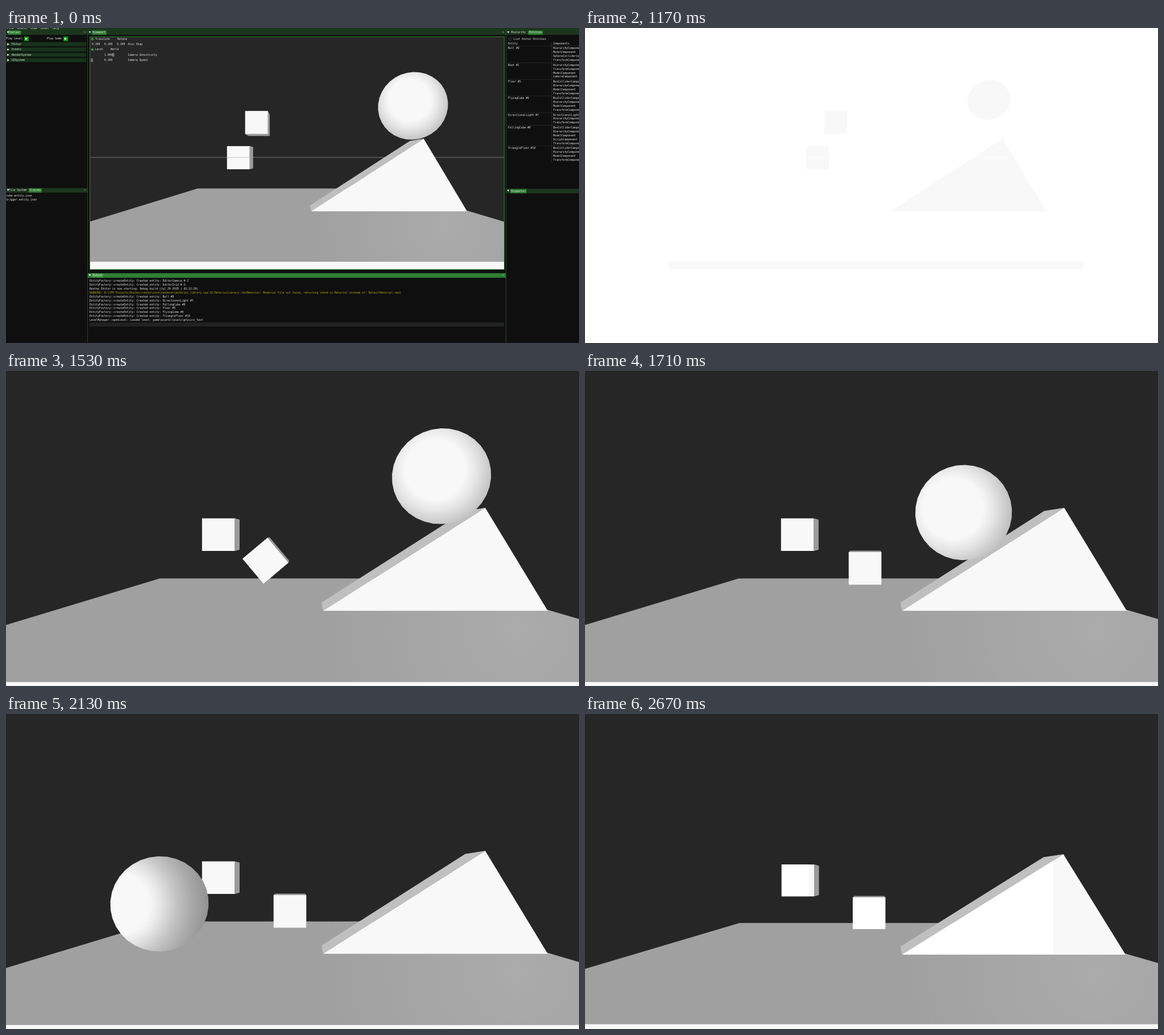
Write an HTML page with a canvas that moves like this. It is 1008 px wide and 555 px high and loops after 3120 ms.

```html
<!DOCTYPE html>
<html lang="en">
<head>
<meta charset="utf-8">
<title>Physics test</title>
<style>
html, body { margin: 0; width: 100%; height: 100%; overflow: hidden; background: #262626; }
canvas { display: block; width: 1008px; height: 555px; }
</style>
</head>
<body>
<canvas id="stage" width="1008" height="555"></canvas>
<script>
const ctx = document.getElementById('stage').getContext('2d');
const LOOP = 3120, STEP = 30;
const WHITE = '#f8f8f8', SIDE = '#9b9b9b', SKY = '#262626';
const GREEN = '#2f7f33', DARK_GREEN = '#1c361d', PANEL = '#0f0f0f';
const EYE = { x: 504, y: 288 };

// Views: x scale, y scale, x shift, y shift.
const EDITOR_VIEW = [0.6945, 0.7052, 149.3, 25.05];
const GAME_VIEW = [1, 1, 0, 0];
const END_VIEW = [0.995, 0.975, 2.7, 12];

const RAMP = [[558, 422.5], [843, 241], [953, 422.5]];
const FLYING = { x: 373.6, y: 288.4, angle: 0 };
const CUBE_START = { x: 419.6, y: 200.6, angle: 0 };
const BALL_START = { x: 816, y: 159 };

const lerp = (a, b, k) => a + (b - a) * k;
const clamp01 = v => Math.max(0, Math.min(1, v));

function rect(x, y, w, h, color) {
  ctx.fillStyle = color;
  ctx.fillRect(x, y, w, h);
}

function poly(points, color) {
  ctx.beginPath();
  points.forEach(([x, y]) => ctx.lineTo(x, y));
  ctx.closePath();
  ctx.fillStyle = color;
  ctx.fill();
}

function disc(x, y, r, color) {
  ctx.beginPath();
  ctx.arc(x, y, r, 0, Math.PI * 2);
  ctx.fillStyle = color;
  ctx.fill();
}

// Tiny text is set large and scaled down to keep fractional advances.
function text(str, x, y, color = '#e8e8e8') {
  ctx.save();
  ctx.translate(x, y);
  ctx.scale(0.1, 0.1);
  ctx.font = '47.4px "DejaVu Sans Mono", monospace';
  ctx.textBaseline = 'middle';
  ctx.fillStyle = color;
  ctx.fillText(str, 0, 0);
  ctx.restore();
}

// ---------- motion ----------

function ballAt(t) {
  const u = Math.max(0, t - 1285), slopeEnd = 1866;
  if (t < slopeEnd) {
    const x = 816 - 0.00083 * u * u;
    return { x, y: 186 + (765 - x) * (x > 765 ? 0.55 : 0.64) };
  }
  if (t < 1890) {
    const k = (t - slopeEnd) / (1890 - slopeEnd);
    return { x: lerp(535.8, 509.5, k), y: lerp(332, 332.5, k) };
  }
  return { x: 509.5 - 0.998 * (t - 1890), y: 332.5 + (t - 1890) / 120 };
}

function cubeAt(t) {
  const hit = 1390, land = 1530;
  if (t < hit) {
    const u = Math.max(0, t - 1282);
    return { x: CUBE_START.x, y: CUBE_START.y + 0.00254 * u * u, angle: 0 };
  }
  if (t < land) {
    const k = (t - hit) / (land - hit);
    return { x: lerp(CUBE_START.x, 456.5, k), y: 230 + 104.3 * (0.6 * k + 0.4 * k * k), angle: 50 * k };
  }
  const tip = clamp01((t - land) / 120), slide = clamp01((t - land) / 300);
  return {
    x: lerp(456.5, 499.5, 1 - (1 - slide) ** 2),
    y: lerp(334.3, 347.8, tip * tip),
    angle: lerp(50, 90, tip)
  };
}

// ---------- scene ----------

function cubeFront({ x, y, angle }) {
  return [0, 1, 2, 3].map(i => {
    const a = (angle + 90 * i - 135) * Math.PI / 180, r = 28.7 * Math.SQRT2;
    return [x + r * Math.cos(a), y + r * Math.sin(a)];
  });
}

function cube(pose, color = WHITE) {
  const front = cubeFront(pose);
  const back = front.map(([x, y]) => [lerp(EYE.x, x, 0.915), lerp(EYE.y, y, 0.915)]);
  front.forEach((p, i) => {
    const j = (i + 1) % 4;
    poly([p, front[j], back[j], back[i]], SIDE);
  });
  poly(front, color);
}

function ball({ x, y }) {
  const dx = x - EYE.x, dy = y - EYE.y;
  const minor = 83.8, major = minor * (1 + 6e-7 * (dx * dx + dy * dy));
  const tilt = Math.atan2(dy, dx), c = Math.cos(tilt), s = Math.sin(tilt);
  const outline = Array.from({ length: 34 }, (_, i) => {
    const a = i / 34 * Math.PI * 2 + x / 84;
    const px = major * Math.cos(a), py = minor * Math.sin(a);
    return [x + px * c - py * s, y + px * s + py * c];
  });
  const u = 815 - x;
  const hx = x - 8 - 0.06 * u - 0.0001 * u * u;
  const hy = y - 14 * clamp01(1 - u / 306);
  const shade = ctx.createRadialGradient(hx, hy, 0, hx, hy, 160);
  [[0.33, WHITE], [0.45, '#e6e6e6'], [0.62, '#c4c4c4'], [0.8, '#a8a8a8'], [0.97, '#939393']]
    .forEach(([at, color]) => shade.addColorStop(at, color));
  poly(outline, shade);
}

function floor() {
  const glow = ctx.createRadialGradient(900, 455, 0, 900, 455, 350);
  glow.addColorStop(0, '#ababab');
  glow.addColorStop(0.5, '#a5a5a5');
  glow.addColorStop(1, '#a0a0a0');
  poly([[270.5, 365.5], [765, 365.5], [1060, 452.3], [1060, 548], [-30, 548], [-30, 456.6]], glow);
  rect(-30, 548, 1090, 40, WHITE);
}

function ramp() {
  poly([[558, 422.5], [555, 408], [808, 246.5], [843, 241]], '#bfbfbf');
  poly(RAMP, WHITE);
}

function scene(view, cubePose, ballPose, overlay) {
  ctx.save();
  const [sx, sy, tx, ty] = view;
  ctx.transform(sx, 0, 0, sy, tx, ty);
  floor();
  ramp();
  cube(cubePose);
  cube(FLYING);
  if (overlay) overlay();
  if (ballPose) ball(ballPose);
  ctx.restore();
}

function endGlare() {
  poly([[558, 422.5], [825.5, 252.2], [825.5, 422.5]], '#fff');
  poly(cubeFront(cubeAt(2670)), '#fff');
  rect(344.9, 259.7, 48, 57.4, '#fff');
}

function flash() {
  rect(0, 0, 1008, 555, '#fff');
  ctx.save();
  ctx.transform(EDITOR_VIEW[0], 0, 0, EDITOR_VIEW[1], EDITOR_VIEW[2], EDITOR_VIEW[3]);
  [RAMP, cubeFront(CUBE_START), cubeFront(FLYING)].forEach(p => poly(p, WHITE));
  ctx.restore();
  rect(147.5, 411.5, 729, 13.5, WHITE);
  ctx.beginPath();
  ctx.ellipse(710.5, 127, 38, 34.5, -0.4, 0, Math.PI * 2);
  ctx.fill();
  rect(147, 227.5, 729, 1, '#fff');
}

// ---------- editor ----------

function arrow(x, y, down, size = 2) {
  const s = size;
  poly(down ? [[x - s, y - s], [x + s, y - s], [x, y + s]] : [[x - s, y - s], [x + s, y], [x - s, y + s]], '#fff');
}

// tabs: [label, x, active]
function titleBar(x, y, w, tabs, focused, closable = true) {
  rect(x, y, w, 8, focused ? GREEN : DARK_GREEN);
  tabs.forEach(([label, tx, active]) => {
    if (active) rect(tx - 1.5, y + 0.5, label.length * 2.853 + 3, 7.5, focused ? '#3b9640' : GREEN);
    text(label, tx, y + 4.2);
  });
  arrow(x + 3.5, y + 3.6, true, 1.7);
  if (closable) text('×', x + w - 6, y + 4, '#b8c8b8');
}

function toolbar(focused) {
  titleBar(0, 4, 143, [['Toolbar', 5, true]], focused);
  [['Play Level', 0, 32], ['Play Game', 72, 101]].forEach(([label, x, bx]) => {
    text(label, x, 18.3);
    rect(bx, 15, 8, 8, '#08a008');
    arrow(bx + 4, 19, false);
  });
  ['Editor', 'Events', 'RenderSystem', 'UISystem'].forEach((label, i) => {
    const y = 28.6 + i * 9.35;
    rect(0, y - 3.6, 141, 7, '#17331a');
    arrow(4, y, false, 1.8);
    text(label, 10, y);
  });
}

function viewport() {
  titleBar(144, 4, 735, [['Viewport', 152.5, true]], false);
  ctx.save();
  ctx.beginPath();
  ctx.rect(147.5, 15.5, 729, 409.5);
  ctx.clip();
  rect(147, 15, 730, 411, SKY);
  rect(147, 227.5, 729, 1, '#777');
  scene(EDITOR_VIEW, CUBE_START, BALL_START);
  rect(389, 227.7, 40, 0.8, '#b4b4b4');
  ctx.restore();
  ctx.strokeStyle = GREEN;
  ctx.lineWidth = 1;
  ctx.strokeRect(147.5, 15.5, 729, 410);

  [[19.3, 'Translate', 'Rotate', 196], [38, 'Local', 'World', 184]].forEach(([y, a, b, x]) => {
    disc(152, y, 2.6, '#236b27');
    disc(152, y, 1.6, '#3fa544');
    text(a, 157, y);
    text(b, x, y);
  });
  [151, 173, 195].forEach(x => text('0.100', x, 28.7));
  text('Axis Snap', 214.5, 28.7);
  rect(187, 44.2, 3.5, 6.2, '#777');
  rect(149.3, 53.6, 3.5, 6.2, '#777');
  text('1.000', 173, 47.4);
  text('Camera Sensitivity', 214.5, 47.4);
  text('0.100', 173, 56.8);
  text('Camera Speed', 214.5, 56.8);
}

function output(focused) {
  titleBar(144, 432, 735, [['Output', 152.5, true]], focused);
  const created = name => 'EntityFactory::createEntity: Created entity: ' + name;
  const lines = [
    created('EditorCamera #-2'),
    created('EditorGrid #-3'),
    'Rootex Editor is now starting. Debug build (Jul 29 2020 | 02:22:20)',
    'WARNING: D:\\CPP Projects\\Rootex\\rootex\\core\\renderer\\material_library.cpp:32:MaterialLibrary::GetMaterial: ' +
      'Material File not found, returning stand-in Material instead of: DefaultMaterial.rmat',
    ...['Ball #9', 'DirectionalLight #7', 'FallingCube #8', 'Floor #5', 'FlyingCube #6', 'TriangleFloor #10'].map(created),
    'LevelManager::openLevel: Loaded level: game\\assets\\levels\\physics_test'
  ];
  lines.forEach((line, i) => text(line, 147, 445.7 + i * 6.93, line.startsWith('WARNING') ? '#b9ae00' : undefined));
  rect(147, 518.8, 729, 7.2, '#222');
}

function entities() {
  titleBar(880, 4, 128, [['Hierarchy', 888.5], ['Entities', 920, true]], false, false);
  rect(883.5, 15.7, 7, 7, '#1e1e1e');
  text('List Editor Entities', 893, 19.3);
  text('Entity', 883, 27.3);
  text('Components', 962.5, 27.3);
  const solid = 'BoxCollider Hierarchy Model Transform';
  const rows = [
    ['Ball #9', 'Hierarchy Model SphereCollider Transform'],
    ['Root #1', 'Hierarchy Transform Model Camera'],
    ['Floor #5', solid],
    ['FlyingCube #6', solid],
    ['DirectionalLight #7', 'DirectionalLight Hierarchy Transform'],
    ['FallingCube #8', 'BoxCollider Hierarchy Model Script Transform'],
    ['TriangleFloor #10', solid]
  ];
  let y = 36.1;
  rows.forEach(([name, parts]) => {
    const list = parts.split(' ');
    rect(881, y - 4.6, 127, 0.7, '#2c2c2c');
    text(name, 883, y);
    list.forEach((part, i) => text(part + 'Component', 962.5, y + i * 6.95));
    y += list.length * 6.95 + 1.5;
  });
  rect(959.5, 24, 0.8, y - 28, '#333');
}

function editor(playClicked) {
  rect(0, 0, 1008, 555, PANEL);
  rect(0, 0, 1008, 4, DARK_GREEN);
  [['File', 2], ['Assets', 19.5], ['View', 43], ['Level', 61], ['Help', 82]]
    .forEach(([label, x]) => text(label, x, 0.6));
  toolbar(playClicked);
  viewport();
  output(!playClicked);
  entities();
  titleBar(0, 282, 143, [['File System', 5], ['Classes', 41.5, true]], false);
  text('cube.entity.json', 0, 295.8);
  text('trigger.entity.json', 0, 302.6);
  titleBar(880, 283.2, 128, [['Inspector', 888.5, true]], false, false);
  rect(143, 4, 1, 551, '#1d4a20');
  rect(879, 4, 1, 551, '#1d4a20');
}

// ---------- timeline ----------

function render(t) {
  if (t < 1170) return editor(t >= 720);
  if (t < 1230) return flash();
  rect(0, 0, 1008, 555, SKY);
  if (t < 2670) scene(GAME_VIEW, cubeAt(t), t < 2550 ? ballAt(t) : null);
  else scene(END_VIEW, cubeAt(t), null, endGlare);
}

const start = performance.now();
function tick() {
  const t = (performance.now() - start) % LOOP;
  render(Math.floor(t / STEP) * STEP);
  requestAnimationFrame(tick);
}
tick();
</script>
</body>
</html>
```
